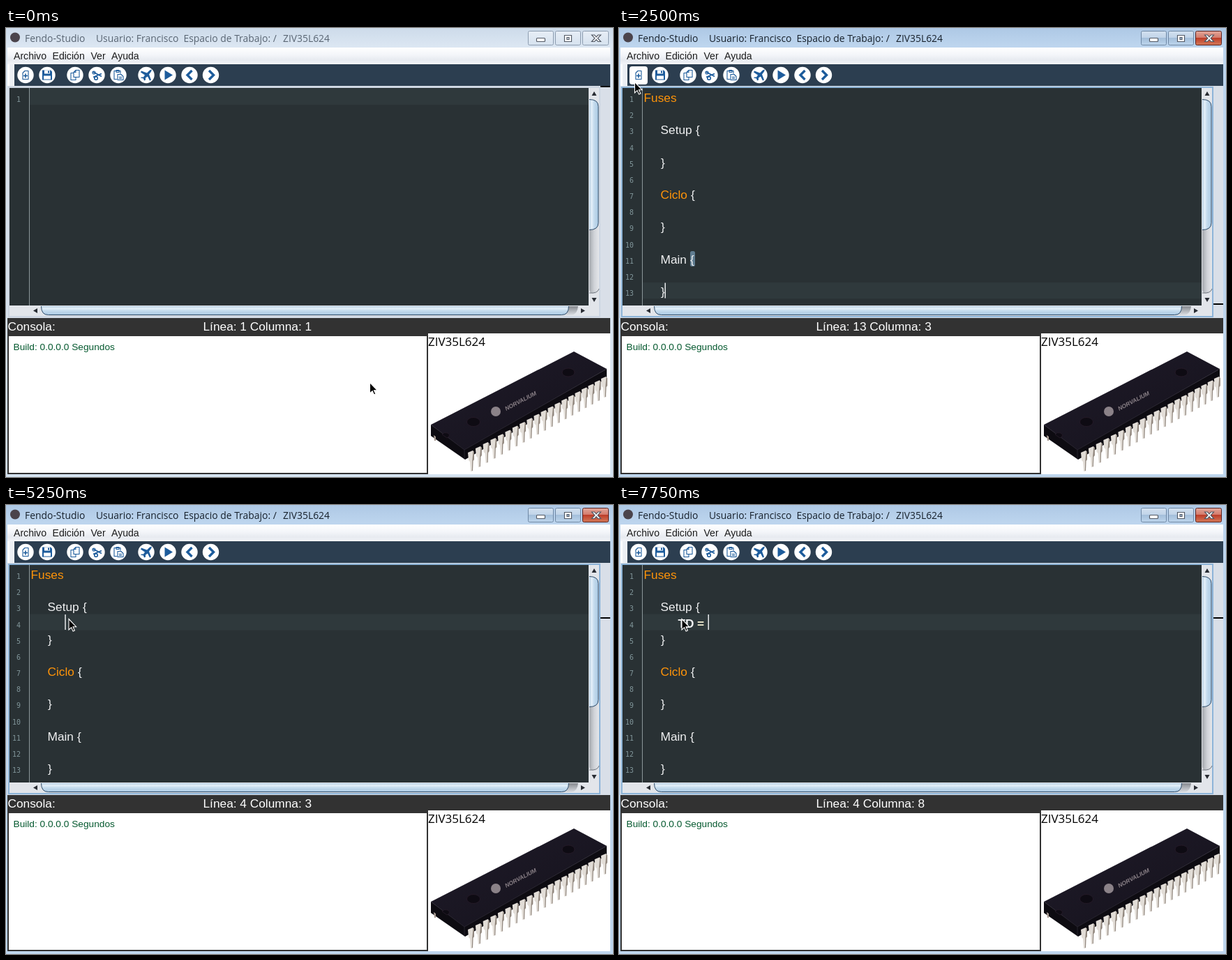
An HTML page for the animation above (8 s loop, 870 by 644 pixels).

```html
<!DOCTYPE html>
<html lang="es">
<head>
<meta charset="utf-8">
<title>Editor</title>
<style>
  html, body { margin: 0; width: 100%; height: 100%; overflow: hidden; background: #c8dbef; }
  svg { display: block; width: 870px; height: 644px; font: 17.3px "Liberation Sans", Arial, sans-serif; }
  .title { font: 13.9px "Open Sans", "Noto Sans", sans-serif; fill: #596573; }
  .menu { font-size: 14.1px; fill: #1b1b1b; }
  .nums { font: 10px "DejaVu Sans Mono", monospace; fill: #81969a; text-anchor: end; }
  .status { fill: #fff; }
  .code { fill: #f0f1f2; }
  .code .key { fill: #ff9409; }
  .frame { fill: url(#frameOff); }
  .pane { fill: #cdd6e2; }
  .btn, .close { fill: url(#btnOff); stroke: #8d9db0; }
  .active .title { fill: #17212c; }
  .active .frame { fill: url(#frameOn); }
  .active .pane { fill: #8db4d8; }
  .active .btn { fill: url(#btnOn); stroke: #6f88a5; }
  .active .close { fill: url(#closeOn); stroke: #5a2320; }
  .icon { fill: none; stroke: #1d5c9c; stroke-width: 1.6; stroke-linejoin: round; }
  .icon .solid { fill: #1d5c9c; stroke: none; }
  .icon .disc { fill: #fff; stroke: none; }
  .icon .thin { stroke-width: 1.1; }
  .icon .bold { stroke-width: 3.4; stroke-linejoin: miter; }
</style>
</head>
<body>
<svg id="win" viewBox="0 0 870 644">
  <defs>
    <linearGradient id="frameOff" x2="0" y2="1"><stop stop-color="#cddbea"/><stop offset=".04" stop-color="#dbe6f2"/><stop offset="1" stop-color="#d5e3f1"/></linearGradient>
    <linearGradient id="frameOn" x2="0" y2="1"><stop stop-color="#aec8e5"/><stop offset=".04" stop-color="#bdd5ee"/><stop offset="1" stop-color="#bed6ee"/></linearGradient>
    <linearGradient id="btnOff" x2="0" y2="1"><stop stop-color="#e7eef6"/><stop offset="1" stop-color="#d6e2ef"/></linearGradient>
    <linearGradient id="btnOn" x2="0" y2="1"><stop stop-color="#d3e1f0"/><stop offset=".48" stop-color="#c0d3e8"/><stop offset=".5" stop-color="#a4bfdb"/><stop offset="1" stop-color="#bdd5ec"/></linearGradient>
    <linearGradient id="closeOn" x2="0" y2="1"><stop stop-color="#e3a89b"/><stop offset=".48" stop-color="#d3796a"/><stop offset=".5" stop-color="#bd3d29"/><stop offset="1" stop-color="#d47a59"/></linearGradient>
    <linearGradient id="menuBg" x2="0" y2="1"><stop stop-color="#fff"/><stop offset=".45" stop-color="#f3f5f9"/><stop offset=".75" stop-color="#e7eaf0"/><stop offset="1" stop-color="#f3f5f9"/></linearGradient>
    <linearGradient id="thumbV"><stop stop-color="#b4cde2"/><stop offset=".25" stop-color="#e6f1fa"/><stop offset=".5" stop-color="#c6dcee"/><stop offset="1" stop-color="#a9c8e2"/></linearGradient>
    <linearGradient id="thumbH" x2="0" y2="1"><stop stop-color="#b4cde2"/><stop offset=".25" stop-color="#e6f1fa"/><stop offset=".5" stop-color="#c6dcee"/><stop offset="1" stop-color="#a9c8e2"/></linearGradient>
    <linearGradient id="trackV"><stop stop-color="#a5a9af"/><stop offset=".5" stop-color="#d0d3d8"/><stop offset="1" stop-color="#e4e6ea"/></linearGradient>
    <linearGradient id="trackH" x2="0" y2="1"><stop stop-color="#85898f"/><stop offset="1" stop-color="#dcdfe4"/></linearGradient>
    <linearGradient id="top" x2="1" y2="1"><stop stop-color="#1f1b29"/><stop offset="1" stop-color="#15121c"/></linearGradient>
  </defs>

  <rect class="frame" width="870" height="644"/>

  <!-- Title bar -->
  <circle cx="13" cy="13.5" r="7" fill="#4b444c"/>
  <g class="title">
    <text x="27" y="20">Fendo-Studio</text>
    <text x="129" y="20">Usuario: Francisco</text>
    <text x="254.5" y="20">Espacio de Trabajo: /</text>
    <text x="397" y="20">ZIV35L624</text>
  </g>
  <rect class="btn" x="748.5" y="4.5" width="36" height="20" rx="2"/>
  <rect class="btn" x="787.5" y="4.5" width="36" height="20" rx="2"/>
  <rect class="close" x="826.5" y="4.5" width="37" height="20" rx="2"/>
  <g fill="#fff" stroke="#535a66" stroke-width="1.2">
    <rect x="760.5" y="14.5" width="12" height="5" rx="1"/>
    <path fill-rule="evenodd" d="M800.5 10.5h10v9h-10zM804 13.5h3v3h-3z"/>
    <path d="M839.5 10h4l2.500 2.800 2.500-2.800h4l-4.400 4.700 4.400 4.800h-4l-2.500-2.800-2.500 2.800h-4l4.400-4.800z"/>
  </g>

  <!-- Menu and toolbar -->
  <rect x="2" y="28" width="864" height="24" fill="url(#menuBg)"/>
  <g class="menu">
    <text x="11" y="44.5">Archivo</text>
    <text x="66.5" y="44.5">Edición</text>
    <text x="121.5" y="44.5">Ver</text>
    <text x="151" y="44.5">Ayuda</text>
  </g>
  <rect x="2" y="52" width="864" height="364" fill="#d9dfe8"/>
  <rect x="2" y="52" width="10" height="31" fill="#eceff4"/>
  <path d="M3.500 52v31" stroke="#fff" stroke-width="3"/>
  <rect x="12" y="52" width="854" height="31" fill="#2c3e50"/>
  <rect id="hover" x="15" y="55" width="26" height="26" rx="4" fill="#fff"/>
  <g id="icons">
    <g class="icon"><path class="thin" d="M-4-3l3-3h5v12h-8z"/><path d="M0-2v6M-3 1h6"/></g>
    <g class="icon"><path class="solid" d="M-7-7h12l2 2v12h-14z"/><path class="disc" d="M-4-7h8v5h-8zM-5 1h10v5h-10z"/><path class="solid" d="M1-6h2v3h-2z"/></g>
    <g class="icon"><path class="thin" d="M-2-4l3-3h5v10h-8zM-2-3h-4v10h7v-4M-2-4h3v-3"/></g>
    <g class="icon"><path d="M-6-5L7 2M-5 3L7-2"/><circle class="thin" cx="-4" cy="-3.5" r="2"/><circle cx="-1" cy="4.5" r="2.3"/></g>
    <g class="icon"><path class="thin" d="M-2 6h-4v-12h9v4M-3-7h4v3h-4zM-1-1h5l3 3v5h-8z"/><path class="thin" d="M1 3h4M1 5h4"/></g>
    <g class="icon"><path class="solid" d="M8-8L5-7 1-3-7-6-8-4-2 0-4 3-7 3-8 4-4 5-3 8-1 7-1 4 2 2 5 8 7 7 4-1 7-5z"/></g>
    <g class="icon"><path class="solid" d="M-4.500-7L7 0-4.500 7z"/></g>
    <g class="icon"><path class="bold" d="M3.500-6.500L-3 0 3.500 6.500"/></g>
    <g class="icon"><path class="bold" d="M-2.500-6.500L4 0-2.500 6.500"/></g>
  </g>

  <!-- Editor -->
  <rect class="pane" x="3" y="84" width="849" height="331"/>
  <rect x="5" y="86" width="845" height="327" fill="#e2e5ea"/>
  <rect x="5" y="86" width="830" height="312" fill="#293134"/>
  <rect id="band" x="34" width="801" height="23.2" fill="#2f393c"/>
  <path d="M33.500 86v312" stroke="#8b9799"/>
  <g class="nums" id="nums"></g>
  <rect id="match" x="102" y="320" width="7" height="22" rx="2.5" fill="#5f7c90"/>
  <g class="code" id="code"></g>
  <rect id="caret" width="1.5" height="22" fill="#e8eaec"/>
  <rect id="mark" x="852" width="14" height="2" fill="#000"/>

  <!-- Scroll bars -->
  <rect x="836" y="270" width="14" height="111" rx="6" fill="url(#trackV)"/>
  <path d="M836 102.500q13 0 13 10v167q0 10-13 10" fill="url(#thumbV)" stroke="#2d4a68"/>
  <path d="M836 380q12 1 14-6" fill="none" stroke="#70767f"/>
  <path d="M790 399h30q-1 12-10 13h-20z" fill="url(#trackH)"/>
  <path d="M50.500 399q0 12.500 10 12.500h736q10 0 10-12.500" fill="url(#thumbH)" stroke="#2d4a68"/>
  <path d="M839.500 97l3.500-6 3.500 6zM839.500 387l3.500 6 3.500-6zM45 402l-6 3.500 6 3.500zM824 402l6 3.500-6 3.500z" fill="#282c33"/>

  <!-- Console -->
  <rect x="2" y="416" width="864" height="24" fill="#323232"/>
  <rect x="2" y="438" width="603" height="202" fill="#323232"/>
  <rect x="4" y="442" width="599" height="196" fill="#fff"/>
  <text class="status" x="2.5" y="434">Consola:</text>
  <text class="status" id="status" x="282.5" y="434"></text>
  <text x="10.5" y="462" font-size="13.7" fill="#05592f">Build: 0.0.0.0 Segundos</text>

  <!-- Chip -->
  <rect x="605" y="438" width="261" height="202" fill="#fff"/>
  <text x="605" y="456" style="font: 17px 'Open Sans', 'Noto Sans', sans-serif">ZIV35L624</text>
  <path d="M609 569L657 604 861 489V503L658 619 609 585z" fill="#0d0b11"/>
  <path d="M609 569L814 464 861 489 657 605z" fill="url(#top)"/>
  <path d="M609 569L657 605 861 489M657 605v13" fill="none" stroke="#2d2934" stroke-width=".8"/>
  <path d="M613 584l3 2v6h-2z" fill="#a99c94"/>
  <g fill="#0e0b13" stroke="#2b1f2d" stroke-width=".7">
    <ellipse cx="806" cy="494" rx="9" ry="6"/>
    <ellipse cx="670" cy="565" rx="9.5" ry="6.5"/>
    <path d="M625 583q3-4 8-2q4 2 2 5l-3 2z"/>
  </g>
  <circle cx="702" cy="550" r="7" fill="#8b8288"/>
  <text transform="translate(717 549) rotate(-28)" font-size="8.3" font-style="italic" font-weight="bold" fill="#8b8288">NORVALIUM</text>
  <g id="pins"></g>

  <path id="cursor" d="M.5.500v15.500l3.600-3.400 2.500 5.400 2.300-1-2.400-5.300h4.600z" fill="#000" stroke="#fff" stroke-width="1.1"/>
</svg>
<script>
const $ = id => document.getElementById(id);
const NS = "http://www.w3.org/2000/svg";
const LOOP = 8000, ROW = 23.17;

function add(parent, tag, attrs, text = "") {
  const el = document.createElementNS(NS, tag);
  for (const k in attrs) el.setAttribute(k, attrs[k]);
  el.textContent = text;
  return parent.appendChild(el);
}
const set = (id, k, v) => $(id).setAttribute(k, v);
const show = (id, on) => set(id, "visibility", on ? "visible" : "hidden");
const rowTop = line => 87 + ROW * (line - 1);
const baseline = line => 106 + ROW * (line - 1);

// Toolbar buttons
[28, 59, 99, 130, 161, 201, 232, 263, 293.5].forEach((x, i) => {
  const icon = $("icons").children[i];
  icon.setAttribute("transform", `translate(${x} 67.5)`);
  icon.prepend(add(icon, "circle", { r: 11.7, class: "disc" }));
});

// Line numbers and template
const nums = [];
for (let n = 1; n <= 13; n++) nums.push(add($("nums"), "text", { x: 21, y: baseline(n) }, n));

const template = add($("code"), "g", { id: "template" });
function word(line, x, text, cls = "") {
  add(template, "text", { x, y: baseline(line), class: cls }, text);
}
word(1, 35.5, "Fuses", "key");
word(3, 59.5, "Setup");
word(7, 59.5, "Ciclo", "key");
word(11, 59.5, "Main");
word(3, 110, "{");
word(7, 103, "{");
word(11, 102, "{");
[5, 9, 13].forEach(line => word(line, 60, "}"));
add($("code"), "text", { id: "typed", x: 84.5, y: baseline(4) });
add($("code"), "text", { id: "equals", x: 112, y: baseline(4), fill: "#f0ecd0", "font-weight": "bold" }, "=");

// Chip legs
for (let i = 0; i < 20; i++) {
  const x = 667 + 10.9 * i - 0.045 * i * i, y = 608 - 0.555 * (x - 667);
  const leg = add($("pins"), "g", { transform: `translate(${x} ${y})` });
  add(leg, "path", { d: "M-5 1L2-2 4 0V11L2.500 13 2 27-1 28-2 14-4 12z", fill: "#e2ddd7" });
  add(leg, "path", { d: "M2.500-1L4 0V11L2.500 13 2 27 .8 27.500 1.300 12z", fill: "#91877e" });
}

// Each step changes only the listed fields
const steps = [
  [0, { at: [521, 508], hover: false, active: false, line: 1, mark: 83, match: false,
        caret: 0, text: "", eq: false, pos: [1, 1] }],
  [1250, { at: [56, 138] }],
  [1500, { at: [41, 117] }],
  [1750, { at: [28, 89] }],
  [2000, { at: [22, 77], hover: true }],
  [2250, { active: true, pos: [13, 3] }],
  [2500, { line: 13, mark: 395, match: true, caret: 65.5 }],
  [2750, { at: [64, 111], hover: false, caret: 0 }],
  [3000, { at: [88, 152] }],
  [3250, { at: [89.5, 163], caret: 65.5, pos: [4, 1] }],
  [3500, { line: 4, mark: 161, match: false, caret: 36.3 }],
  [3750, { caret: 0 }],
  [4250, { caret: 60.3, pos: [4, 2] }],
  [4750, { caret: 0 }],
  [5250, { caret: 84.3, pos: [4, 3] }],
  [5750, { caret: 0 }],
  [6000, { caret: 95, text: "T", pos: [4, 4] }],
  [6250, { caret: 107.3, text: "TD", pos: [4, 5] }],
  [6750, { caret: 112.3, pos: [4, 6] }],
  [7250, { caret: 122.6, eq: true, pos: [4, 7] }],
  [7750, { caret: 127.5, pos: [4, 8] }]
];

let last = -1;
function draw(now) {
  const t = now % LOOP;
  const past = steps.filter(s => s[0] <= t);
  if (past.length !== last) {
    last = past.length;
    render(Object.assign({}, ...past.map(s => s[1])));
  }
  requestAnimationFrame(() => draw(performance.now() - start));
}

function render(s) {
  $("win").classList.toggle("active", s.active);
  set("cursor", "transform", `translate(${s.at})`);
  show("hover", s.hover);
  show("template", s.active);
  nums.forEach((n, i) => n.setAttribute("visibility", s.active || !i ? "visible" : "hidden"));
  set("band", "y", rowTop(s.line));
  set("mark", "y", s.mark);
  show("match", s.match);
  show("caret", s.caret);
  set("caret", "x", s.caret);
  set("caret", "y", rowTop(s.line) + 0.5);
  $("typed").textContent = s.text;
  set("typed", "font-weight", s.text.length > 1 ? "bold" : "normal");
  show("equals", s.eq);
  $("status").textContent = `Línea: ${s.pos[0]} Columna: ${s.pos[1]}`;
}

const start = performance.now();
draw(0);
</script>
</body>
</html>
```
